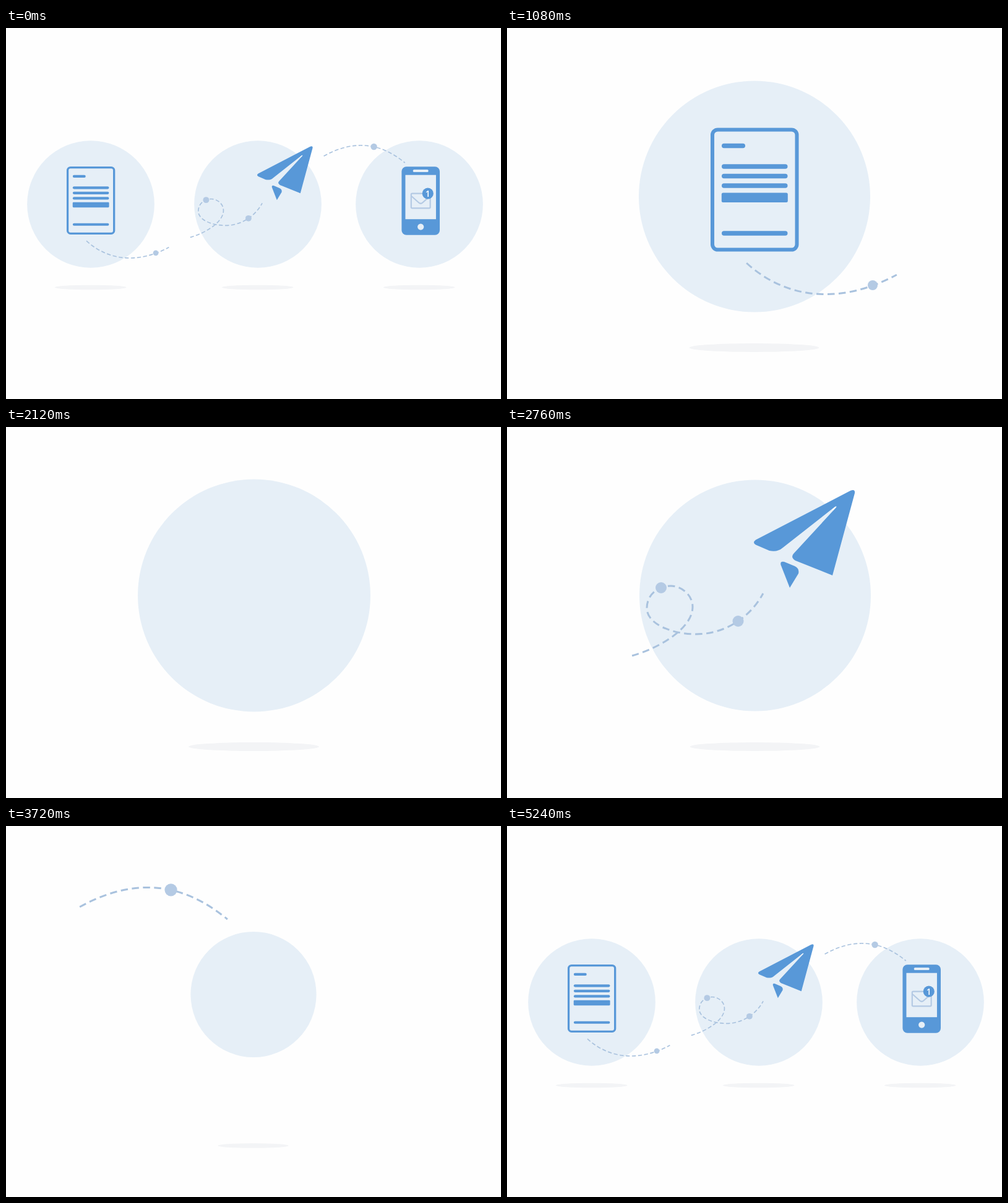
An HTML page for the animation above (5.84 s loop, 800 by 600 pixels).

```html
<!DOCTYPE html>
<html lang="en">
<head>
<meta charset="utf-8">
<title>Document, plane, phone</title>
<style>
  html, body { margin: 0; width: 100%; height: 100%; overflow: hidden; background: #fefefe; }
  svg { display: block; width: 800px; height: 600px; }
  .disc, .light { fill: #e6eff7; }
  .shadow { fill: #f3f4f6; }
  .blue { fill: #5898d8; }
  .line { fill: none; stroke: #a9c2de; stroke-width: 3; stroke-dasharray: 11.5 6.5; }
  .reveal { fill: none; stroke: #fff; stroke-width: 9; stroke-dasharray: 1 2; }
  .dot { fill: #b4cae4; }
  .page { fill: none; stroke: #5898d8; stroke-width: 6; }
  .bar { stroke: #5898d8; stroke-width: 7.5; stroke-linecap: round; }
  .mail { fill: none; stroke: #b4cae4; stroke-width: 4; }
  text { font: 600 25px "Open Sans", sans-serif; fill: #fff; text-anchor: middle; }
</style>
</head>
<body>
<svg viewBox="0 0 800 600">
  <defs>
    <clipPath id="bowl"><path d="M-187 0A187 187 0 0 0 187 0V-300H-187Z"/></clipPath>
  </defs>
</svg>
<script>
const LOOP = 5840, STEP = 40, CY = 272.5;
const svg = document.querySelector("svg");

const bar = (x1, x2, y) => `<path class="bar" d="M${x1 + 3.75} ${y}H${x2 - 3.75}"/>`;

const page = `
  <rect class="page" x="205" y="164.5" width="136.5" height="194" rx="8.5"/>
  ${bar(220, 258, 190.5)}
  ${[224, 239.5, 255, 332].map(y => bar(220, 326.5, y)).join("")}
  <rect class="blue" x="219.8" y="266.5" width="107" height="15.5" rx="2.5"/>`;

const plane = `
  <path class="blue" d="M555 103Q563 99.500 562 107L526 240L466 216Q458 211 463 205L532 130
    Q533.500 127 530 129L446 195Q437 203 424 200L402 190.500Q396 187 402 182.500Z"/>
  <path class="blue" d="M442.500 223Q441 216.500 448 218L465 225Q473 229 471 237L457 260Z"/>`;

const phone = `
  <rect class="blue" x="348" y="162" width="112" height="201" rx="14"/>
  <rect class="light" x="381.500" y="170.500" width="45" height="7.500" rx="3"/>
  <rect class="light" x="359" y="186.500" width="90" height="130"/>
  <circle class="light" cx="404" cy="339" r="9.300"/>
  <rect class="mail" x="376" y="241" width="56" height="43" rx="3"/>
  <path class="mail" d="M376 248L398 267.500Q404 273 410 267.500L432 248"/>
  <g id="badge"><circle class="blue" cx="425" cy="241" r="16.500"/><text x="425" y="250">1</text></g>`;

// Times in ms: pop, rise, draw and dots are [start, duration]; home is the place in the overview.
const scenes = [
  { cx: 273, mid: 400, home: 137, from: -700, art: page,
    path: "M260 380C325 439.500 413 447.500 503 399",
    dots: [[464, 416, 8, 920, 160]],
    pop: [160, 320], rise: [394 + 160, 350], shift: [0, 320], draw: [800, 240], leave: 1360, lean: 47 },
  { cx: 401, mid: 401, home: 407, from: -320, art: plane,
    path: "M202 370C245 358 300 326 300 291C300 270 280 257 265 257C243 257 226 272 226 293C226 318 265 335 306 335C350 335 392 310 414 269",
    dots: [[249, 260, 9, 2480, 120], [373.5, 314, 9, 2600, 160]],
    pop: [2000, 320], rise: [394 + 2000, 350], shift: [-90, 200], draw: [2360, 280], leave: 3160, lean: 80 },
  { cx: 400, mid: 400, home: 668, from: 400, art: phone,
    path: "M119 131C200 86 280 86 358 151",
    dots: [[266.5, 103.3, 9.5, 3600, 160]],
    pop: [3698, 156], rise: [4074, 286], shift: [0, 320], draw: [3560, 150], leave: Infinity, lean: 0 }
];

scenes.forEach((s, i) => {
  const g = document.createElementNS("http://www.w3.org/2000/svg", "g");
  const local = `transform="translate(${-s.cx} ${-CY})"`;
  g.innerHTML = `
    <mask id="m${i}" maskUnits="userSpaceOnUse" x="0" y="0" width="800" height="600">
      <path class="reveal" pathLength="1" d="${s.path}"/>
    </mask>
    <ellipse class="shadow" cx="-.500" cy="244.500" rx="105" ry="7"/>
    <circle class="disc" r="187"/>
    <g ${local}>
      <path class="line" mask="url(#m${i})" d="${s.path}"/>
      ${s.dots.map(([x, y]) => `<circle class="dot" cx="${x}" cy="${y}"/>`).join("")}
    </g>
    <g clip-path="url(#bowl)"><g class="art"><g ${local}>${s.art}</g></g></g>`;
  svg.append(g);
  const find = q => g.querySelector(q);
  Object.assign(s, { g, disc: find(".disc"), shadow: find(".shadow"), reveal: find(".reveal"),
    artBox: find(".art"), dotEls: g.querySelectorAll(".dot") });
});
const badge = document.getElementById("badge");

const part = (t, start, span) => Math.min(1, Math.max(0, (t - start) / span));
const mix = (a, b, p) => a + (b - a) * p;
const smooth = p => p * p * (3 - 2 * p);
const backOut = (p, c = 1.70158) => p <= 0 ? 0 : 1 + (c + 1) * (p - 1) ** 3 + c * (p - 1) ** 2;
const set = (el, value) => el.setAttribute("transform", value);

// Lean to the right first, then speed off to the left.
function slide(t, s) {
  const away = part(t, s.leave + 80, 320);
  return s.lean * Math.sin(part(t, s.leave, 80) * Math.PI / 2) - (711 + s.lean) * away ** 1.5;
}

function render(time) {
  const now = Math.floor(time % LOOP / STEP) * STEP;
  const t = now < STEP ? LOOP : now;
  const zoom = smooth(part(t, 4880, 360));

  for (const s of scenes) {
    const x = zoom > 0 ? mix(s.from, s.home, zoom) : s.mid + slide(t, s);
    set(s.g, `translate(${x} ${mix(CY, 285, zoom)}) scale(${mix(1, 0.55, zoom)})`);

    const size = backOut(part(t, ...s.pop));
    s.disc.setAttribute("r", 187 * size);
    s.shadow.setAttribute("rx", 105 * size);
    s.shadow.setAttribute("ry", 7 * size);

    const rise = 1 - backOut(part(t, ...s.rise));
    set(s.artBox, `translate(${s.shift[0] * rise} ${s.shift[1] * rise})`);
    s.artBox.style.display = t < s.rise[0] ? "none" : "";

    s.reveal.setAttribute("stroke-dashoffset", 1 - part(t, ...s.draw));
    s.dots.forEach(([, , r, start, span], i) =>
      s.dotEls[i].setAttribute("r", r * backOut(part(t, start, span))));
  }

  set(badge, `translate(442 258) scale(${backOut(part(t, 4360, 200), 2.6)}) translate(-442 -258)`);
}

const begin = performance.now();
function tick() {
  render(performance.now() - begin);
  requestAnimationFrame(tick);
}
tick();
</script>
</body>
</html>
```
